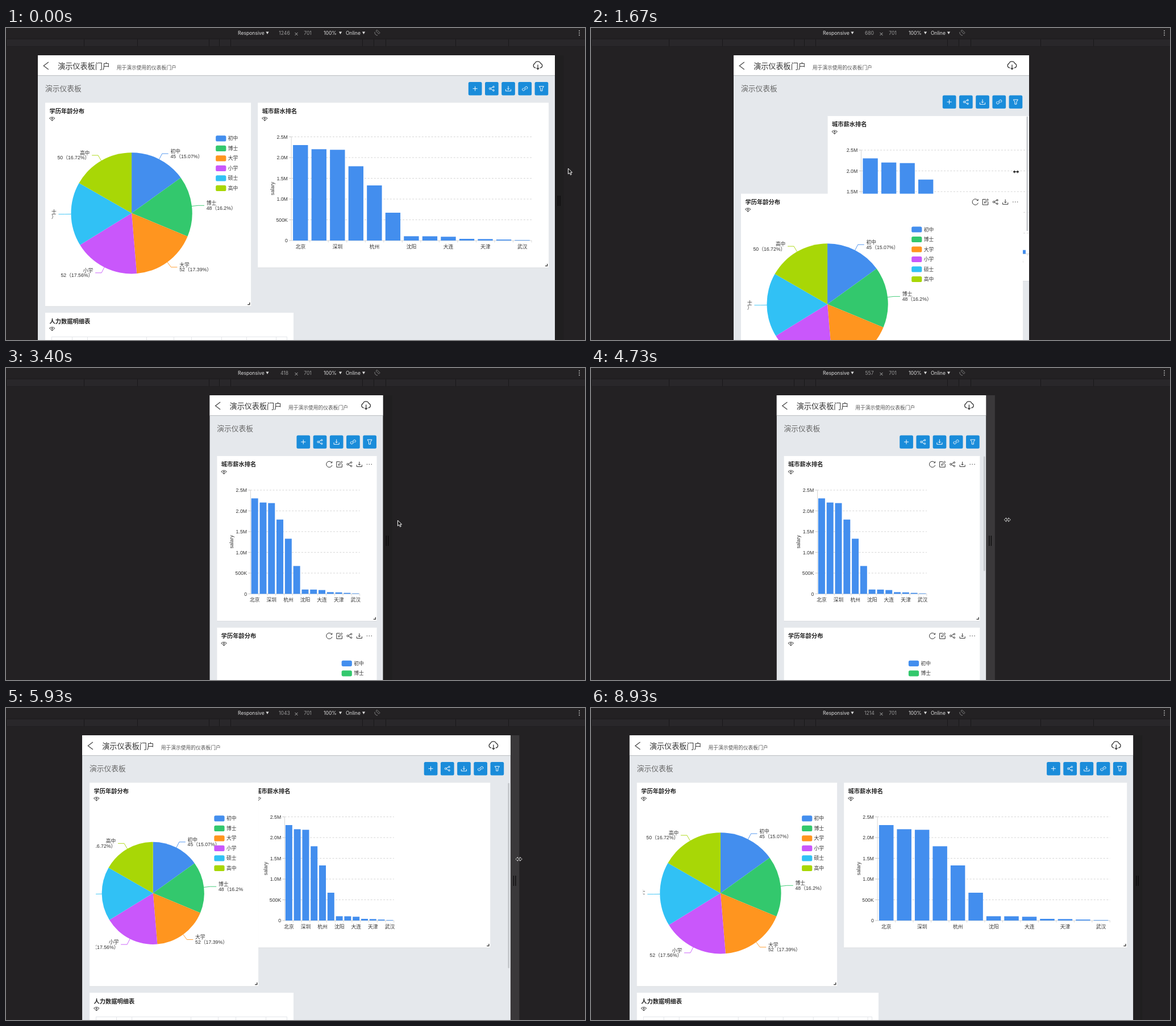
Recreate the animation shown at these times as an HTML page. Size 1019 by 549 pixels, loop 8990 ms.

```html
<!DOCTYPE html>
<html lang="zh-CN">
<head>
<meta charset="utf-8">
<title>Responsive dashboard</title>
<style>
html, body { margin: 0; width: 100%; height: 100%; overflow: hidden; background: #232123; }
svg { display: block; }
text { font-family: "Liberation Sans", "Noto Sans CJK SC", "Noto Sans CJK", sans-serif; white-space: pre; }
.ui { font-family: Inter, Roboto, sans-serif; }
</style>
</head>
<body>
<script>
const LOOP = 8990, FRAME = 200 / 3, SCALE = 0.7303, MID = 511;
const GAP = 12, MARGIN = 13, TOP = 131.5, PIE_H = 358, BAR_H = 290, SINGLE = 561, COMPACT = 724;

// ---------- motion ----------
const widthKeys = [[0, 910], [670, 910], [850, 880], [1200, 772], [1550, 580], [1900, 400],
  [2200, 320], [2270, 319.9], [2470, 305.3], [3870, 305.3], [4300, 318], [4730, 366],
  [4920, 528], [5200, 617], [5400, 635], [5670, 704], [6600, 880], [6720, 886.6]];
const cursorKeys = [[0, 992, 252.5], [530, 973, 262], [670, 973, 262], [850, 950, 260],
  [1200, 864, 256.5], [1550, 772, 254], [1900, 700, 251], [2200, 674, 250], [2470, 670, 250],
  [2800, 670, 252], [3050, 740, 262], [3400, 692, 273.5], [3730, 669, 270], [3870, 671, 270],
  [4300, 690, 268], [4730, 732, 267], [5200, 834.5, 266.5], [5670, 880, 266], [6600, 960, 265.5],
  [6720, 962, 265.5], [7470, 962, 265], [7900, 740, 100], [8330, 542, 22], [8600, 520, -20]];

function track(keys, t, i = 1) {
  const n = keys.findIndex(k => k[0] > t);
  if (n < 0) return keys[keys.length - 1][i];
  if (n === 0) return keys[0][i];
  const a = keys[n - 1], b = keys[n];
  return a[i] + (b[i] - a[i]) * (t - a[0]) / (b[0] - a[0]);
}
const widthAt = t => track(widthKeys, t);
const within = (t, a, b) => t >= a && t < b;

function crossing(down) {
  for (let t = 0; t < LOOP; t++) {
    const a = widthAt(t), b = widthAt(t + 1);
    if (down ? a >= SINGLE && b < SINGLE : a < SINGLE && b >= SINGLE) return t;
  }
}
const stackTime = crossing(true), splitTime = crossing(false);
const settle = (t, from) => 1 - (1 - Math.min(1, Math.max(0, (t - from) / 350))) ** 2.3;
const stacking = t => settle(t, stackTime) - settle(t, splitTime);
const innerWidth = w => w - MARGIN - 11;
const span = (w, cols) => (innerWidth(w) - 11 * GAP) / 12 * cols + GAP * (cols - 1);

// ---------- drawing helpers ----------
function el(parent, tag, attrs = {}, content) {
  const node = document.createElementNS('http://www.w3.org/2000/svg', tag);
  set(node, attrs);
  if (content !== undefined) node.textContent = content;
  if (parent) parent.appendChild(node);
  return node;
}
function set(node, attrs) {
  for (const k in attrs) node.setAttribute(k, attrs[k]);
}
const group = parent => el(parent, 'g');
const place = (node, x, y) => node.setAttribute('transform', `translate(${x} ${y})`);
const show = (node, on) => node.setAttribute('visibility', on ? 'visible' : 'hidden');
const rect = (p, x, y, width, height, fill, more) => el(p, 'rect', { x, y, width, height, fill, ...more });
const line = (p, d, stroke = '#333', width = 1, more) =>
  el(p, 'path', { d, stroke, fill: 'none', 'stroke-width': width, ...more });
// y is the vertical centre of the text
const text = (p, x, y, str, size, fill = '#333', more) =>
  el(p, 'text', { x, y: y + size * 0.36, 'font-size': size, fill, ...more }, str);
const ring = (x, y, r) => `M${x - r} ${y}a${r} ${r} 0 1 0 ${2 * r} 0a${r} ${r} 0 1 0 ${-2 * r} 0`;

const icons = {
  plus: 'M-4 0H4M0-4V4',
  share: 'M-1.8-.7L2-2.7M-1.8 .7L2 2.7' + ring(-3, 0, 1.5) + ring(3.2, -3.1, 1.3) + ring(3.2, 3.1, 1.3),
  save: 'M-4.6 1V4.2H4.6V1M0-4.5V1.6M-2-.4L0 1.6 2-.4',
  link: 'M-1 1.2A2 2 0 0 1-1-1.2L1-3A2 2 0 0 1 4 0L3 1M1-1.2A2 2 0 0 1 1 1.2L-1 3A2 2 0 0 1-4 0L-3-1',
  filter: 'M-4-4H4L1.5 0V4H-1.5V0Z',
  refresh: 'M4.4-2.8A5.2 5.2 0 1 0 5 1.6M4.9-5V-2.5H2.4',
  edit: 'M1-4.6H-4.8V5H4.8V-.5M-1.6 1.9L-1-.5 4-5.3 5.3-4 .6 1.2Z',
  expand: 'M1-1L4.3-4.3M1.3-4.3H4.3V-1.3M-1 1L-4.3 4.3M-4.3 1.3V4.3H-1.3',
  more: 'M-4.6 0h1.4M-.7 0h1.4M3.2 0h1.4',
  drill: 'M-1.5-3L-4.8-.6-1.6 1.8M1.5-3L4.8-.6 1.6 1.8M0-3.6V3.6M-2-1H2M-1.8 2L0 4 1.8 2',
  cloud: 'M-4 4H-5A4 4 0 0 1-5.5-3.4A5.6 5.6 0 0 1 5-3.6A4 4 0 0 1 5 4H4M0-1.5V6.8M-2.4 4.4L0 6.8 2.4 4.4',
};
function icon(p, name, x, y, color, width = 1) {
  const node = line(p, icons[name], color, width);
  place(node, x, y);
  return node;
}

// ---------- browser frame ----------
const root = el(document.body, 'svg', { width: 1019, height: 549, viewBox: '0 0 1019 549' });
rect(root, 0, 0, 1019, 549, '#232123');
rect(root, 0, 18.5, 1019, 14, '#1f1d1f');
rect(root, 0, 20, 1019, 12, '#29272a');
for (const x of [0, 137, 231, 357, 375, 395, 627, 647, 668, 791, 884])
  rect(root, x, 20, 1, 12, '#19181a');

const label = (x, str, fill = '#dedede', anchor = 'start') =>
  text(root, x, 8.7, str, 8.6, fill, { class: 'ui', 'text-anchor': anchor });
label(408, 'Responsive');
label(559, '100%');
label(598, 'Online');
label(531, '701', '#999', 'middle');
const sizeLabel = label(490, '', '#999', 'middle');
line(root, 'M508.5 8l5 5m0-5l-5 5', '#bbb', 0.9);
for (const x of [460, 588.5, 629.5]) el(root, 'path', { d: `M${x - 2.6} 6.5h5.2l-2.6 4.6z`, fill: '#ddd' });
line(root, 'M651 5.2l2-1.8 5 5-2 2zM649 7a5 5 0 0 0 5 6', '#999', 0.8);
for (const y of [5, 8.7, 12.4]) el(root, 'circle', { cx: 1009, cy: y, r: 1, fill: '#bbb' });

const handle = group(root);
const handleFill = rect(handle, 0, 48, 15.5, 501, '#201f20');
line(handle, 'M5.5 295V313M9 295V313', '#0c0b0c', 1.3);

// ---------- page ----------
const page = el(root, 'svg', { y: 0, height: 549 });
const body = rect(page, 0, 48, 0, 501, '#e5e8ec');
const header = rect(page, 0, 48, 0, 35, '#fff');
const headerLine = rect(page, 0, 83, 0, 1.2, '#c3c5c8');
line(page, 'M18.8 60L10.2 66.5 18.8 73', '#444', 1.2);
text(page, 35.2, 67.5, '演示仪表板门户', 13.1);
text(page, 138.7, 69.7, '用于演示使用的仪表板门户', 8.76, '#555');
text(page, MARGIN, 106.5, '演示仪表板', 12.75, '#666');
const cloud = icon(page, 'cloud', 0, 66, '#333', 1.3);

const buttons = group(page);
['plus', 'share', 'save', 'link', 'filter'].forEach((name, i) => {
  const x = -152.2 + i * 29.2;
  rect(buttons, x, 95, 23.7, 23.4, '#1a8cda', { rx: 2.5 });
  icon(buttons, name, x + 11.8, 106.7, '#fff', 0.95);
});

function makeCard(title, height) {
  const g = group(page);
  rect(g, 0, 1, 0, height, '#000', { opacity: 0.05 });
  rect(g, 0, 0, 0, height, '#fff');
  const backs = [...g.children];
  text(g, 7.5, 14.9, title, 10.25, '#222', { 'font-weight': 700 });
  icon(g, 'drill', 12.2, 28, '#333', 0.9);
  const corner = line(g, `M-6 ${height - 2.8}h3.6v-3.6`, '#333', 1.3);
  const tools = group(g);
  const expand = icon(tools, 'expand', -65.7, 14.5, '#333');
  ['more', 'save', 'share'].forEach((name, i) => icon(tools, name, -13.3 - 17.5 * i, 14.5, '#333'));
  const left = group(tools);
  icon(left, 'edit', -66, 14.5, '#333');
  icon(left, 'refresh', -83.7, 14.5, '#333');
  return {
    chart: group(g),
    update(x, y, w, toolMode) {
      place(g, x, y);
      for (const b of backs) b.setAttribute('width', w);
      place(corner, w, 0);
      place(tools, w, 0);
      place(left, toolMode === 2 ? -17.5 : 0, 0);
      show(tools, toolMode > 0);
      show(expand, toolMode === 2);
    },
  };
}
const table = makeCard('人力数据明细表', 200);
const bars = makeCard('城市薪水排名', BAR_H);
const pie = makeCard('学历年龄分布', PIE_H);

const grid = el(table.chart, 'svg', { x: 11, y: 41 });
rect(grid, 0, 1, 600, 1, '#e4e6ea');
for (const x of [0, 36, 63, 167, 215, 246, 299, 343, 395]) rect(grid, x, 1, 1, 100, '#e4e6ea');
const gridEnd = rect(grid, 0, 1, 1, 100, '#e4e6ea');

// ---------- charts ----------
const FONT = 8.76;
const cities = ['北京', '深圳', '杭州', '沈阳', '大连', '天津', '武汉'];
const barHeights = [168, 160.7, 159.7, 130.7, 97, 49, 7.6, 7.5, 6.7, 3, 2.6, 1.7, 0.8];

function drawBars(cardWidth) {
  const g = bars.chart, x0 = 59, base = 242.5, plot = cardWidth - 89, step = plot / 13;
  g.replaceChildren();
  ['0', '500K', '1.0M', '1.5M', '2.0M', '2.5M'].forEach((str, i) => {
    const y = base - i * 36.5;
    text(g, x0 - 6.3, y, str, FONT, '#333', { 'text-anchor': 'end' });
    line(g, `M${x0 - 4} ${y}H${x0}`, '#bbb', 0.8);
    if (i) line(g, `M${x0} ${y}h${plot}`, '#ccc', 0.8, { 'stroke-dasharray': '3 2.6' });
  });
  line(g, `M${x0} 60V${base}h${plot}`, '#ccc', 0.8);
  barHeights.forEach((h, i) => {
    const x = x0 + i * step;
    rect(g, x + step * 0.09, base - h, step * 0.81, h, '#438eee');
    line(g, `M${x + step} ${base}v3.5`, '#ccc', 0.7);
    if (i % 2 === 0)
      text(g, x + step / 2, base + 10.5, cities[i / 2], FONT, '#333', { 'text-anchor': 'middle' });
  });
  text(g, 0, 0, 'salary', FONT, '#333', {
    'text-anchor': 'middle', transform: `translate(${x0 - 33.5} 151) rotate(-90)` });
}

const slices = [
  ['初中', 45, 15.07, '#438eee'], ['博士', 48, 16.2, '#33c86d'], ['大学', 52, 17.39, '#ff951f'],
  ['小学', 52, 17.56, '#c957fb'], ['硕士', 51, 17.06, '#31c1f5'], ['高中', 50, 16.72, '#a8d706']];

function drawPie(cardWidth) {
  const w = cardWidth - 22, cx = (w - 58) / 2, cy = 194.3;
  const r = 0.45 * Math.min(w - 59, 237);
  const at = (share, radius) => {
    const a = share * Math.PI / 50;
    return [cx + radius * Math.sin(a), cy - radius * Math.cos(a)];
  };
  pie.chart.replaceChildren();
  const g = el(pie.chart, 'svg', { x: 11, y: 0, width: w, height: PIE_H - 10 });
  let from = 0;
  slices.forEach(([name, count, share, fill], i) => {
    const mid = from + share / 2, dir = mid < 50 ? 1 : -1;
    el(g, 'path', { fill, d: `M${cx} ${cy}L${at(from, r)}A${r} ${r} 0 0 1 ${at(from + share, r)}Z` });
    const [ex, ey] = at(mid, r + 11), tx = ex + dir * 14.7;
    line(g, `M${at(mid, r)}L${ex} ${ey}h${dir * 11}`, fill, 0.9);
    const anchor = { 'text-anchor': dir > 0 ? 'start' : 'end' };
    text(g, tx, ey - 4.3, name, FONT, '#333', anchor);
    text(g, tx, ey + 4.3, `${count}（${share}%）`, FONT, '#333', anchor);
    const y = 62.8 + 17.5 * i;
    rect(g, w - 51, y - 5, 18.2, 10.2, fill, { rx: 2.6 });
    text(g, w - 29.5, y, name, FONT);
    from += share;
  });
}

// charts keep their size until the layout has settled
let drawnWidth = 0;
function layoutCharts(t) {
  const w = t < 3000 ? 910 : t < 7600 ? 305.3 : 886.6;
  if (w === drawnWidth) return;
  drawnWidth = w;
  const single = w < SINGLE;
  drawBars(single ? innerWidth(w) : span(w, 7));
  drawPie(single ? innerWidth(w) : span(w, 5));
}

const scrollbar = rect(page, 0, 0, 2.6, 0, '#c3c6ca', { rx: 1.3 });

// ---------- cursors ----------
const pen = { fill: '#111', stroke: '#fff', 'stroke-width': 1, 'stroke-linejoin': 'round' };
const arrow = el(root, 'path', { d: 'M-2.6-5.5V4.4L-.2 2.3 1.5 6 3.2 5.2 1.6 1.7H4.5Z', ...pen });
const resize = el(root, 'path', {
  d: 'M-5.6 0L-2-3.4V-1.1H2V-3.4L5.6 0 2 3.4V1.1H-2V3.4Z', ...pen, 'stroke-width': 0.8 });

function render(t) {
  const w = widthAt(t), single = w < SINGLE, left = MID - w / 2;
  const stack = stacking(t), drop = single ? 23.4 : 0, top = TOP + drop;

  sizeLabel.textContent = Math.floor(widthAt(t + 45) / SCALE + 0.1);
  set(page, { x: left, width: w });
  for (const r of [body, header, headerLine]) r.setAttribute('width', w);
  place(cloud, w - 30, 66);
  place(buttons, w, drop);

  layoutCharts(t);
  const inner = innerWidth(w), toolMode = single ? 1 : w < COMPACT ? 2 : 0;
  const column = span(widthAt(t - 300), 5) + GAP;
  bars.update(MARGIN + column * (1 - stack), top, single ? inner : span(w, 7), toolMode);
  pie.update(MARGIN, top + (BAR_H + GAP) * stack, single ? inner : span(w, 5), toolMode);
  const tableWidth = single ? inner : span(w, 6);
  table.update(MARGIN, top + PIE_H + 11.5 + (BAR_H + GAP) * stack, tableWidth, toolMode);
  set(grid, { width: tableWidth - 22, height: 150 });
  set(gridEnd, { x: tableWidth - 23 });

  show(scrollbar, within(t, 750, 3000) || within(t, 4000, 7300));
  set(scrollbar, { x: w - 4.5, y: top + 0.5,
    height: single ? 202 : Math.min(332, 304 + (w - 617) * 0.16) });

  const active = within(t, 670, 860) || within(t, 3870, 7500);
  place(handle, left + w, 0);
  show(handle, !within(t, 860, 1700));
  handleFill.setAttribute('fill', active ? '#3a383a' : '#201f20');

  const x = track(cursorKeys, t), y = track(cursorKeys, t, 2);
  const dragging = within(t, 600, 2860) || within(t, 3720, 7500);
  place(arrow, x, y);
  place(resize, x, y);
  show(arrow, !dragging);
  show(resize, dragging);
}

const start = performance.now();
function tick() {
  const t = (performance.now() - start) % LOOP;
  render(Math.floor((t + 4) / FRAME) * FRAME);
  requestAnimationFrame(tick);
}
tick();
</script>
</body>
</html>
```
